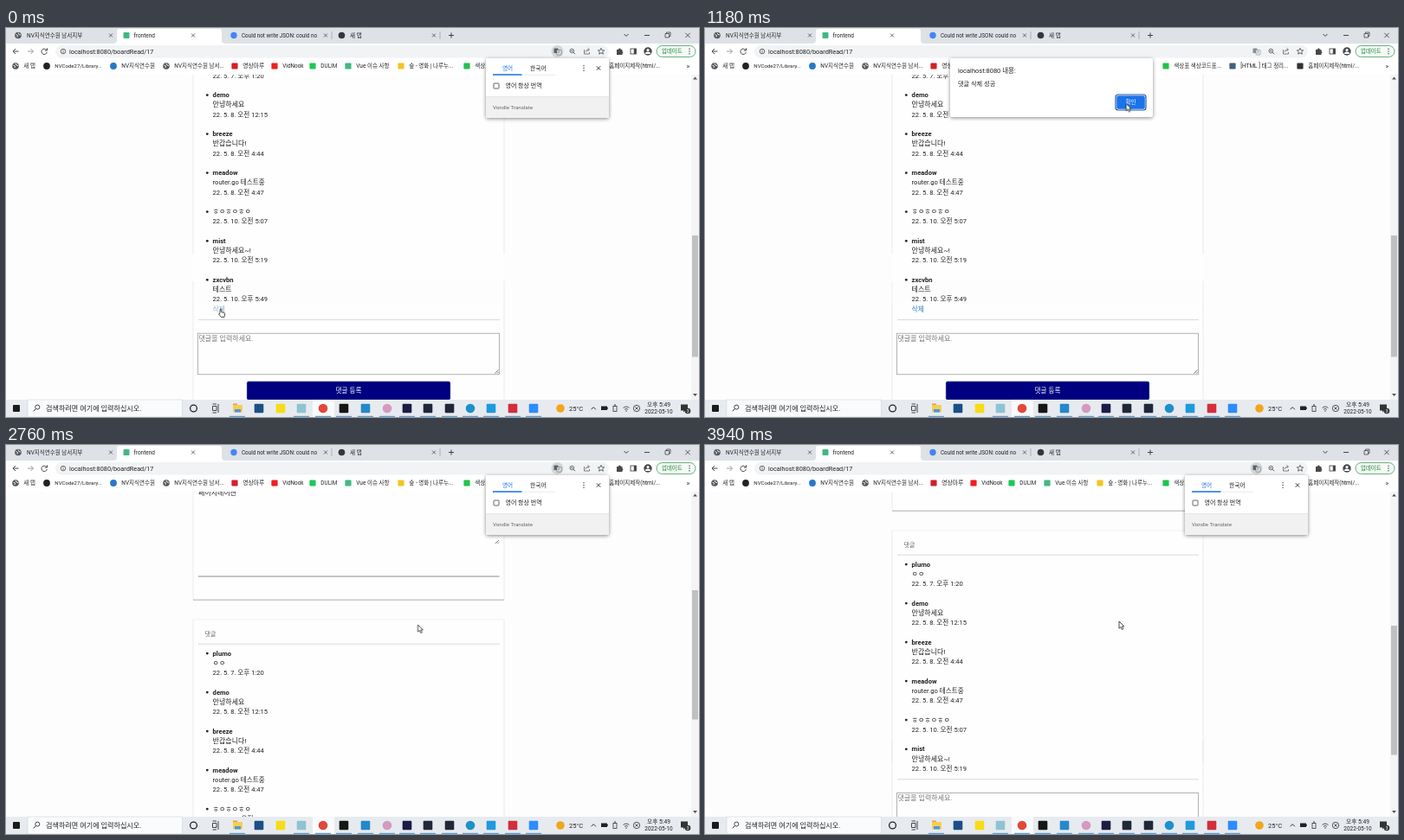
An HTML page for the animation above (4000 ms loop, 800 by 450 pixels).

```html
<!DOCTYPE html>
<html lang="ko">
<head>
<meta charset="utf-8">
<title>Comment board</title>
<style>
html, body { margin: 0; width: 100%; height: 100%; overflow: hidden; background: #fdfdfd; }
svg { display: block; width: 800px; height: 450px; }
text { font-family: Roboto, "Noto Sans CJK KR", "Noto Sans CJK", sans-serif; fill: #222; }
.anim { animation-duration: 4s; animation-iteration-count: infinite; animation-timing-function: linear; }
.hard { animation-timing-function: step-end; }

#page { animation-name: scroll; }
@keyframes scroll {
  0% { transform: translateY(-208.5px); animation-timing-function: step-end; }
  60%, 72.5% { transform: none; animation-timing-function: ease-in-out; }
  86.25%, 92% { transform: translateY(-259px); animation-timing-function: ease-in-out; }
  98.5%, 100% { transform: translateY(-103px); }
}
#thumbNew { animation-name: thumb; }
@keyframes thumb {
  0%, 72.5% { transform: none; animation-timing-function: ease-in-out; }
  86.25%, 92% { transform: translateY(103px); animation-timing-function: ease-in-out; }
  98.5%, 100% { transform: translateY(41px); }
}
#below { animation-name: below; }
@keyframes below { 0% { transform: translateY(56.25px); } 60%, 100% { transform: none; } }

.before { animation-name: before; }
@keyframes before { 0% { opacity: 1; } 60%, 100% { opacity: 0; } }
.after { animation-name: after; }
@keyframes after { 0% { opacity: 0; } 60%, 100% { opacity: 1; } }
.idle { animation-name: idle; }
@keyframes idle { 0% { opacity: 1; } 37.5% { opacity: 0; } 60%, 100% { opacity: 1; } }
.busy { animation-name: busy; }
@keyframes busy { 0% { opacity: 0; } 37.5% { opacity: 1; } 60%, 100% { opacity: 0; } }
.popup { animation-name: popup; }
@keyframes popup { 0% { opacity: 1; } 4.5% { opacity: 0; } 65%, 100% { opacity: 1; } }
.langIcon { animation-name: langIcon; }
@keyframes langIcon { 0% { opacity: 1; } 4.5% { opacity: .7; } 41% { opacity: 0; } 65%, 100% { opacity: 1; } }

#dialog { animation-name: dialog; }
@keyframes dialog {
  0%, 8% { opacity: 0; transform: translateY(-8px); }
  10.5%, 37.5% { opacity: 1; transform: none; }
  38.75% { opacity: 1; transform: translateY(-3px); }
  40.5%, 100% { opacity: 0; transform: translateY(-8px); }
}
#ring { animation-name: ring; }
@keyframes ring { 0% { opacity: 1; } 37%, 100% { opacity: 0; } }

#cursor { animation-name: move; }
@keyframes move {
  0%, 6% { transform: translate(247px, 325px); animation-timing-function: ease-in-out; }
  19.75%, 21% { transform: translate(522px, 100px); animation-timing-function: ease-in-out; }
  32%, 40% { transform: translate(482px, 86px); animation-timing-function: ease-in-out; }
  50%, 53% { transform: translate(477px, 194px); animation-timing-function: ease-in-out; }
  61%, 71% { transform: translate(475.5px, 208px); animation-timing-function: ease-in-out; }
  78%, 100% { transform: translate(478px, 204px); }
}
#hand { animation-name: hand; }
@keyframes hand { 0% { opacity: 1; } 7%, 100% { opacity: 0; } }
#arrow { animation-name: arrow; }
@keyframes arrow { 0% { opacity: 0; } 7%, 100% { opacity: 1; } }
#link { animation-name: link; }
@keyframes link { 0% { fill: #8ab1d3; } 7%, 100% { fill: #2f80c2; } }

#spin { transform-origin: 139px 8.5px; animation-name: spin; animation-duration: 1s; }
@keyframes spin { to { transform: rotate(360deg); } }
#spin path { animation-name: spinColor; }
@keyframes spinColor { 0% { stroke: #dde1e6; } 43%, 100% { stroke: #2f6fd6; } }
</style>
</head>
<body>
<svg id="stage" viewBox="0 0 800 450"></svg>
<script>
const text = (x, y, s, size = 7.6, attrs = "") => `<text x="${x}" y="${y}" font-size="${size}" ${attrs}>${s}</text>`;
const rect = (x, y, w, h, fill, attrs = "") => `<rect x="${x}" y="${y}" width="${w}" height="${h}" fill="${fill}" ${attrs}/>`;
const dot = (x, y, r, fill, attrs = "") => `<circle cx="${x}" cy="${y}" r="${r}" fill="${fill}" ${attrs}/>`;
const line = (d, color = "#45494d", w = 1, attrs = "") => `<path d="${d}" fill="none" stroke="${color}" stroke-width="${w}" ${attrs}/>`;
const cross = (x, y, r, color, w) => line(`M${x - r} ${y - r}l${2 * r} ${2 * r}M${x + r} ${y - r}l${-2 * r} ${2 * r}`, color, w);
const square = (x, y, r, fill) => rect(x - r, y - r, 2 * r, 2 * r, fill, 'rx="1"');
const globe = (x, y) => dot(x, y, 3.8, "#55595d") + line(`M${x - 2.5} ${y - 1}l2 1l-.5 2M${x} ${y - 3}l1 2l2 .5`, "#e8eaed", 1);
const menu = (x, y) => [-2.7, 0, 2.7].map(d => dot(x, y + d, .75, "#45494d")).join("");
const grip = (x, y) => line(`M${x - 4} ${y}l4 -4M${x - 1.5} ${y}l1.5 -1.5`, "#555", .8);
const group = (attrs, ...parts) => `<g ${attrs}>${parts.join("")}</g>`;
const BAR = "\u00a0\u00a0\u00a0|\u00a0\u00a0\u00a0";

// Comments
const ROW = 11.25;
let rowY = 243.7;
function comment(name, body, date) {
  let out = dot(232.3, rowY - 2.6, 1.4, "#222");
  const put = (s, size, attrs) => { out += text(238.6, rowY, s, size, attrs); rowY += ROW; };
  if (name) put(name, 7.6, 'font-weight="700"');
  put(body, body.startsWith("router") ? 7.6 : 8);
  put(date);
  rowY += ROW;
  return out;
}
const comments = [
  ["plumo", "ㅇㅇ", "22. 5. 7. 오후 1:20"],
  ["demo", "안녕하세요", "22. 5. 8. 오전 12:15"],
  ["breeze", "반갑습니다!", "22. 5. 8. 오전 4:44"],
  ["meadow", "router.go 테스트중", "22. 5. 8. 오전 4:47"],
  ["", "ㅎㅇㅎㅇㅎㅇ", "22. 5. 10. 오전 5:07"],
  ["mist", "안녕하세요~!", "22. 5. 10. 오전 5:19"]
].map(c => comment(...c)).join("");
const removed = comment("zxcvbn", "테스트", "22. 5. 10. 오후 5:49")
  + text(238.6, rowY - ROW, "삭제", 7.9, 'id="link" class="anim hard"');

const person = "서나담";
const footer = group('transform="translate(0 605)"',
  rect(0, 0, 791, 130, "#f5f5f5"),
  text(8, 21, `<tspan fill="#2f80c2" style="fill:#2f80c2">고객의 소리</tspan>${BAR}<tspan style="fill:#2f80c2">홈페이지</tspan>${BAR}Quilby${BAR}Plomory`, 7.5),
  text(8, 39.8, ["Personal Project", "Java", "Spring Framework", "Jpa", "Spring boot", "MYSQL", "Javascript", "Vue"].join(BAR), 7.2),
  text(8, 58.2, ["누온의원", "전화번호 : 000-0000-0***", "가상 은솔 000-0000호", "대표자 : " + person, "책임자 : " + person, "개인프로젝트총책임자 : " + person].join(BAR), 7.5),
  text(8, 77.6, "Copyrightⓒ 2022. SEONAMDARIM All rights reserved.", 7.3));

const below = group('id="below" class="anim hard"',
  rect(216, 470, 359, 117, "#fefefe"),
  line("M216 445V587M575 445V587", "#e6e6e8", .8),
  line("M216 587.5H575", "#c9c9cc", 1.3),
  line("M222 489.8H570", "#d5d5d7", .9),
  rect(221.5, 505.5, 348, 47.5, "#fefefe", 'stroke="#aaa" stroke-width=".9"'),
  text(222.5, 514.2, "댓글을 입력하세요.", 8, 'style="fill:#777"'),
  grip(568.5, 551.8),
  rect(278, 561, 235, 21.5, "#000080", 'rx="2" stroke="#aaa" stroke-width=".5"'),
  text(395.5, 574.4, "댓글 등록", 7.6, 'text-anchor="middle" style="fill:#fff"'),
  footer);

const page = group('id="page" class="anim"',
  rect(216, -150, 359, 329, "#fefefe"),
  line("M216 -150V179M575 -150V179", "#e6e6e8", .8),
  line("M216 179.3H575", "#c9c9cc", 1.4),
  text(222, 57.5, "페이지네이션", 8),
  grip(569, 114),
  line("M222 152H569.5", "#8c8c8c", 1),
  rect(216, 202, 359, 300, "#fefefe"),
  line("M216 202H575", "#ececee", .8),
  line("M216 202V470M575 202V470", "#e6e6e8", .8),
  text(229.5, 220.8, "댓글", 7, 'style="fill:#666"'),
  line("M222 230.2H570", "#d5d5d7", .9),
  below, comments, group('class="anim hard before"', removed));

const scrollbar = rect(791, 54, 9, 376, "#f4f4f5")
  + rect(792, 240, 7, 140.5, "#bfc0c2", 'class="anim hard before"')
  + group('class="anim hard after"', rect(792, 168, 7, 149.5, "#bfc0c2", 'id="thumbNew" class="anim"'))
  + '<path d="M793 59.5l2.5-3l2.5 3zM793 423l2.5 3l2.5-3z" fill="#555"/>';

// Browser frame
const tabs = rect(0, 0, 800, 18, "#dee1e6")
  + '<path d="M124 18q4 0 4-4V4q0-3 3-3H246q3 0 3 3v10q0 4 4 4z" fill="#fff"/>'
  + globe(14, 8.5) + text(24, 11, "NV지식연수원 남서지부", 6.5)
  + group('class="anim hard idle"', square(139, 8.5, 3.5, "#41b883"))
  + group('class="anim hard busy"', `<g id="spin" class="anim">${line("M139 5a3.5 3.5 0 1 0 3.5 3.5", "#2f6fd6", 1.4, 'class="anim hard"')}</g>`)
  + text(147.5, 11, "frontend", 6.5)
  + dot(263, 8.5, 3.7, "#4285f4") + text(272, 11, "Could not write JSON: could no", 6.3)
  + dot(387.5, 8.5, 3.8, "#34373a") + text(397, 11, "새 탭", 6.6)
  + [121, 216, 369, 494].map(x => cross(x, 8.5, 2, "#45494d", .8)).join("")
  + line("M376 4V13M501 4V13", "#9a9da2", .7)
  + line("M511 8.5h6M514 5.5v6", "#333", .9)
  + line("M713.5 7l2.5 2.5l2.5-2.5M737 8.5h6", "#333", .9)
  + line("M761 6.5h4.5v4.5h-4.5zM762.5 6.5v-1.5h4.5v4.5h-1.5", "#333", .7)
  + cross(787, 8.5, 2.7, "#333", .8);

const toolbar = rect(0, 18, 800, 36, "#fff")
  + rect(57, 20, 639, 14.5, "#f1f3f4", 'rx="7.25"')
  + line("M14.5 27H8M11 24l-3 3l3 3", "#45494d", 1)
  + line("M25 27h6.5M28.5 24l3 3l-3 3", "#9a9da2", 1)
  + group('class="anim hard idle"', line("M46.8 25.5a3.2 3.2 0 1 0 .5 2.4M47.5 23.3v2.7h-2.7", "#45494d", 1))
  + group('class="anim hard busy"', cross(44.5, 27, 2.8, "#45494d", 1))
  + dot(66, 27, 2.8, "none", 'stroke="#45494d" stroke-width=".8"') + line("M66 26.5v2.2M66 25v.8", "#45494d", .8)
  + text(73, 29.7, "localhost:8080/boardRead/17", 7.3)
  + group('class="anim hard popup"', dot(636.5, 27, 7, "#d3d6d9"))
  + group('class="anim hard langIcon"', rect(632.5, 23.5, 5, 5.5, "#5f6368", 'rx=".6"'), rect(636, 25.5, 5, 5.5, "#fff", 'rx=".6" stroke="#5f6368" stroke-width=".7"'), line("M637.2 27.2h2.6M638.5 26.6v.6l-1.2 2.4M637.6 28l2 1.8", "#5f6368", .6))
  + dot(653.3, 26.5, 2.3, "none", 'stroke="#45494d" stroke-width=".8"') + line("M655 28.2l2 2M652.2 26.5h2.2", "#45494d", .9)
  + line("M667.5 25v5h6v-2M669 28q.5-3 4-3M671.5 23.3l2 1.7l-2 1.7", "#5f6368", .8)
  + line("M687 23.3l1.1 2.4l2.6.2l-2 1.7l.7 2.6l-2.4-1.4l-2.4 1.4l.7-2.6l-2-1.7l2.6-.2z", "#45494d", .8)
  + '<path d="M705 25h2a1.4 1.4 0 0 1 2.8 0h1.7v2a1.4 1.4 0 0 1 0 2.6v1.4h-6.5z" fill="#45494d"/>'
  + rect(721, 24, 6.5, 6, "none", 'stroke="#45494d" stroke-width=".9"') + rect(724.8, 24, 2.7, 6, "#45494d")
  + dot(741, 27, 4.7, "#45494d") + dot(741, 25.5, 1.5, "#fff") + '<path d="M738 30a3 2.4 0 0 1 6 0z" fill="#fff"/>'
  + rect(751, 20.5, 45, 13, "#f4faf5", 'rx="6.5" stroke="#5aa872" stroke-width=".9"')
  + text(757, 29.3, "업데이트", 6.4, 'style="fill:#188038"') + menu(789, 27);

const icon = {
  globe: x => globe(x, 44),
  round: c => x => dot(x, 44, 3.9, c),
  box: c => x => square(x, 44, 3.6, c)
};
const bookmarks = [
  [11, icon.globe, "새 탭"],
  [47, icon.round("#222"), "NVCode27/Library...", 6.1],
  [124, icon.round("#2877c9"), "NV지식연수원"],
  [185, icon.globe, "NV지식연수원 남서..."],
  [264, icon.box("#d2202a"), "영상마루", 6.8],
  [310, icon.box("#f01f1f"), "VidNook", 6.4],
  [354, icon.box("#20c65a"), "DULIM", 6.4],
  [395, icon.box("#41b883"), "Vue 이슈 사항"],
  [456, icon.box("#f3c522"), "숲 - 영화 | 나루누..."],
  [532, icon.box("#24c04c"), "색상표 색상코드표..."],
  [609, icon.box("#41607a"), "[HTML ] 태그 정리..."],
  [687, icon.box("#333"), "홈페이지제작(html/..."]
].map(([x, draw, label, size = 6.5]) => draw(x) + text(x + 9.3, 46.4, label, size)).join("") + text(785.5, 46.5, "»", 8);

const shadow = 'style="filter:drop-shadow(0 1px 2px #0007)"';
const popup = group('class="anim hard popup"',
  rect(554, 35, 142, 69, "#fff", `rx="2" ${shadow}`),
  rect(554, 79.5, 142, 24.5, "#f1f1f2"), line("M554 79.5H696", "#dedee0", .7),
  text(579, 48.5, "영어", 6.6, 'text-anchor="middle" style="fill:#1a73e8"'),
  text(614.5, 48.5, "한국어", 6.8, 'text-anchor="middle"'),
  line("M562 54.2H634", "#dfe1e5", .7), line("M562 54H595.5", "#1a73e8", 1.3),
  menu(667, 46.5), cross(684, 46.5, 2.2, "#333", 1),
  rect(563, 64, 6, 6, "#fff", 'rx=".7" stroke="#555" stroke-width=".9"'),
  text(576.5, 69.4, "영어 항상 번역", 7),
  text(562, 94.2, "Vondle Translate", 6.2, 'style="fill:#666"'));

const dialog = group('id="dialog" class="anim"',
  rect(283, 35, 234, 68, "#fff", `rx="2" ${shadow}`),
  text(292, 52, "localhost:8080 내용:", 7.5),
  text(292, 67, "댓글 삭제 성공", 7.2),
  rect(474, 77, 35, 18, "#fff", 'id="ring" class="anim hard" rx="3" stroke="#2456a8" stroke-width="1.2"'),
  rect(475.2, 78.2, 32.6, 15.6, "#1a73e8", 'rx="2"'),
  text(491.5, 88.4, "확인", 6.6, 'text-anchor="middle" style="fill:#fff"'));

// Taskbar
const apps = [
  [292, square, "#1d4f86"], [317, square, "#f7dc16"], [341, square, "#8fc3d2"], [366, dot, "#e0483c"],
  [390, square, "#161616"], [415, square, "#2489ca"], [440, dot, "#d49ac0"], [463, square, "#1c1c46"],
  [487, square, "#202838"], [512, square, "#202838"], [536, dot, "#1d91c9"], [560, square, "#1f9ade"],
  [585, square, "#d22f3b"], [609, square, "#2d8cff"]
];
const taskbar = rect(0, 430, 800, 20, "#e7ebf0")
  + square(12, 440, 4, "#1b1b1b")
  + rect(25, 430, 178.5, 20, "#fafbfc", 'stroke="#d0d4d8" stroke-width=".6"')
  + dot(36.3, 438.6, 2.5, "none", 'stroke="#333" stroke-width=".9"') + line("M34.5 440.5l-2.8 2.8", "#333", 1)
  + text(46, 442.5, "검색하려면 여기에 입력하십시오.", 8.1)
  + dot(216.5, 440, 3.9, "none", 'stroke="#222" stroke-width="1.3"')
  + line("M238.5 437.5h4.5v5h-4.5zM238.5 435h4.5M238.5 445h4.5M245 435v10", "#333", .9)
  + rect(354, 430, 25, 20, "#f8fafc")
  + rect(262, 434.5, 5, 3, "#e0a72d") + rect(262, 436, 11, 8.5, "#f6cd56", 'rx=".6"') + rect(264, 441, 7, 3.5, "#4b9ad6")
  + apps.map(([x, draw, c]) => draw(x, 440, 5.3, c)).join("")
  + [267, ...apps.slice(2).map(a => a[0])].map(x => rect(x - 9, 448.8, 18, 1.2, "#5b9dd3")).join("")
  + dot(640, 440, 4.8, "#f2a61d") + text(650, 442.9, "25°C", 7.5)
  + line("M675.5 441.3l2.7-2.7l2.7 2.7", "#222", .9)
  + rect(687, 437.5, 7, 4.5, "#222") + rect(694, 439, 1, 1.5, "#222")
  + rect(701, 437.5, 4, 6, "none", 'stroke="#333" stroke-width=".8"') + line("M703 437.5v-2.5", "#333", 1)
  + line("M712.5 439.5a5 5 0 0 1 7 0M714 441.3a3 3 0 0 1 4 0", "#444", .9) + dot(716, 443, .8, "#444")
  + dot(728, 440, 3.7, "none", 'stroke="#333" stroke-width=".8"') + cross(728, 440, 1.6, "#333", .8)
  + text(753.5, 437.8, "오후 5:49", 6.7, 'text-anchor="middle"')
  + text(753.5, 446.2, "2022-05-10", 6.4, 'text-anchor="middle"')
  + '<path d="M779 435.5h8v7h-3l-2 2v-2h-3z" fill="#333"/>'
  + dot(787, 443, 3.3, "#333") + text(787, 445, "3", 5.5, 'text-anchor="middle" style="fill:#fff"');

const cursor = group('id="cursor" class="anim"',
  '<path id="arrow" class="anim hard" d="M0 0v8.2l1.9-1.7l1.4 3l1.5-.7l-1.4-2.9h2.5z" fill="#fff" stroke="#222" stroke-width=".8"/>',
  '<path id="hand" class="anim hard" d="M.4 0q1-.6 1.3.4v3.2l3.4.9q.8.4.6 1.4l-.7 3.5h-3.7l-2.7-3.3q0-1 1.2-.5z" fill="#fff" stroke="#222" stroke-width=".8"/>');

document.getElementById("stage").innerHTML =
  rect(0, 0, 800, 450, "#fdfdfd") + page + scrollbar + tabs + toolbar + bookmarks + popup + dialog + taskbar + cursor;
</script>
</body>
</html>
```
